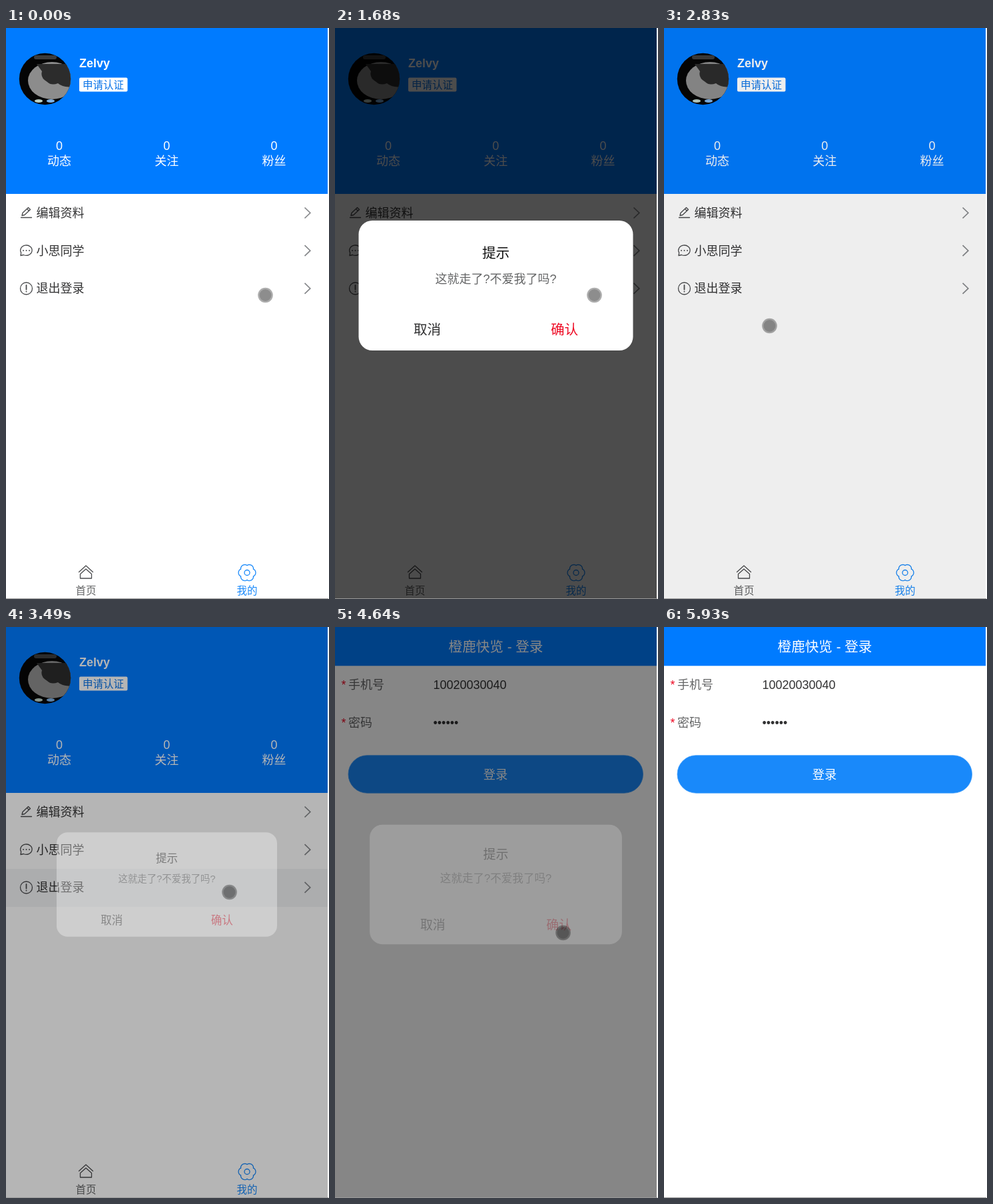
These frames come from a looping animation (485 by 857 pixels, 6360 ms). An HTML page:

```html
<!DOCTYPE html>
<html lang="zh-CN">
<head>
<meta charset="utf-8">
<style>
  html, body { margin: 0; width: 100%; height: 100%; overflow: hidden; background: #fff; }
  svg { display: block; font: 18px "Liberation Sans", "Noto Sans CJK SC", "Noto Sans CJK", sans-serif; fill: #323233; }
  .mid { text-anchor: middle; }
  .white { fill: #fff; }
  .small { font-size: 15.5px; }
  .big { font-size: 20.6px; }
  .line { fill: none; stroke: #4a4b4d; stroke-width: 1.3; stroke-linejoin: round; stroke-linecap: round; }
  .blue { stroke: #1989fa; }
</style>
</head>
<body>
<svg width="485" height="857" viewBox="0 0 485 857">
  <defs>
    <clipPath id="round"><circle cx="58.5" cy="76.5" r="38.7"/></clipPath>
    <path id="chevron" d="M448.5 269.5l8.3 8-8.3 8" fill="none" stroke="#86888b" stroke-width="1.7"/>
  </defs>

  <g id="profile">
    <rect width="483" height="249" fill="#007bff"/>
    <g clip-path="url(#round)">
      <rect x="19" y="37" width="80" height="80" fill="#050505"/>
      <ellipse cx="69" cy="79" rx="36" ry="28" fill="#8c8c8c"/>
      <path d="M46 54h54v34q-14 2-22-5-10 4-16-2-11-6-8-16z" fill="#2c2c2c"/>
      <rect x="42" y="41" width="34" height="6" rx="3" fill="#3c3c3c"/>
      <ellipse cx="49" cy="109.5" rx="6" ry="2.5" fill="#b9cfc5"/>
      <ellipse cx="67" cy="109.5" rx="6" ry="2.5" fill="#7eb2e6"/>
    </g>
    <text class="white" x="110" y="59" font-weight="bold">Zelvy</text>
    <rect class="white" x="110" y="74.5" width="72.5" height="21" rx="2"/>
    <text class="small" x="115" y="90.5" fill="#0a74e8">申请认证</text>
    <g id="stats" class="mid white"></g>

    <rect id="pressed" y="363" width="483" height="57" fill="#f2f3f5"/>
    <g id="rows"></g>
    <g class="line">
      <path d="M22.5 284.5h16M24 281.500l1-4 8.500-8 3 3-8.500 8zM31.500 271.500l3 3"/>
      <path d="M22 341.500l.7-4.200a8.700 7.700 0 1 1 3.600 3.200z"/>
      <circle cx="30.5" cy="391" r="9"/>
      <path d="M30.5 386v6.500M30.500 395.500v.2M26 334h.1M30.500 334h.1M35 334h.1" stroke-width="1.8"/>
    </g>

    <path class="line" d="M109.5 816.500l10.500-9.500 10.500 9.500M111.500 819.500v6.500h17v-6.500l-8.500-7.500z"/>
    <text class="mid small" x="120" y="850" fill="#646566">首页</text>
    <path id="gear" class="line blue"/>
    <circle class="line blue" cx="362" cy="817.5" r="4"/>
    <text class="mid small" x="362" y="850" fill="#1989fa">我的</text>
  </g>

  <g id="login">
    <rect width="483" height="58.3" fill="#007bff"/>
    <text class="mid white big" x="241.5" y="36.5">橙鹿快览 - 登录</text>
    <g fill="#ee0a24"><text x="9.5" y="93">*</text><text x="9.5" y="150">*</text></g>
    <g fill="#646566"><text x="20" y="93">手机号</text><text x="20" y="150">密码</text></g>
    <text x="147.5" y="93">10020030040</text>
    <text x="147.5" y="150">••••••</text>
    <rect x="20" y="192.7" width="442.5" height="56.5" rx="28.2" fill="#1989fa" stroke="#3f9dfb" stroke-width=".8"/>
    <text class="mid white" x="241" y="227.5" font-size="18.3">登录</text>
  </g>

  <rect id="shade" width="483" height="856" fill="#000"/>
  <g id="dialog" class="mid">
    <rect class="white" x="-206" y="-97.5" width="412" height="195" rx="20.5"/>
    <text class="big" y="-42" fill="#111">提示</text>
    <text y="-4" fill="#646566">这就走了?不爱我了吗?</text>
    <text class="big" x="-103" y="73.5">取消</text>
    <text class="big" x="103" y="73.5" fill="#ee0a24">确认</text>
  </g>
  <rect y="856" width="484" height="1" fill="#999"/>

  <g id="touch" fill="#000"><circle r="11.3" opacity=".32"/><circle r="9" opacity=".18"/></g>
  <path id="arrow" d="M.5.5v15.500l3.500-3.300 2.300 5 2.200-1-2.300-4.900h5z" fill="#fff" stroke="#000"/>
</svg>
<script>
const LOOP = 6360, FADE = 300;
const FIRST = 1430, TICK = 139.5;   // the screen refreshes in even ticks
const LOGIN = 23, ARROW = 30, GONE = 32;
const el = id => document.getElementById(id);
const show = (id, on) => el(id).style.display = on ? '' : 'none';

// Pointer stops: [tick, x, y]
const stops = [
  [2, 389.5, 401], [5, 335.5, 454.5], [6, 188.5, 453.5], [7, 138.5, 449.5],
  [9, 140, 449], [10, 158.5, 447], [11, 249.5, 434.5], [13, 332.5, 399.5],
  [15, 335.5, 398], [19, 342.5, 459], [27, 342.5, 459], [28, 320.5, 505.5],
  [29, 247, 533], [30, 247, 533], [31, 284, 535]
];

function pointer(k) {
  const i = stops.findIndex(s => s[0] >= k);
  if (i < 1) return stops.at(i).slice(1);
  const [a, b] = [stops[i - 1], stops[i]];
  const u = (k - a[0]) / (b[0] - a[0]);
  return [1, 2].map(n => a[n] + (b[n] - a[n]) * u);
}

function bezier(x1, y1, x2, y2) {
  const at = (a, b, u) => 3 * a * u * (1 - u) ** 2 + 3 * b * u * u * (1 - u) + u ** 3;
  return x => {
    if (x <= 0 || x >= 1) return x <= 0 ? 0 : 1;
    let lo = 0, hi = 1;
    for (let i = 0; i < 25; i++) {
      const u = (lo + hi) / 2;
      if (at(x1, x2, u) < x) lo = u; else hi = u;
    }
    return at(y1, y2, lo);
  };
}
const ease = bezier(.25, .1, .25, 1), easeIn = bezier(.42, 0, 1, 1), easeOut = bezier(0, 0, .58, 1);

function drawDialog(t) {
  const [open, close] = t < 3000 ? [1329, 2542] : [3456, 4487];
  const leaving = t >= close;
  const p = ease((t - (leaving ? close : open)) / FADE);
  const scale = leaving ? 1 - .1 * p : .7 + .3 * p;
  const dark = leaving ? 1 - easeIn((t - close) / FADE) : easeOut((t - open + 17) / FADE);
  el('dialog').setAttribute('transform', `translate(241.5 386.5) scale(${scale})`);
  el('dialog').setAttribute('opacity', leaving ? 1 - p : p);
  el('shade').setAttribute('opacity', .7 * dark);
}

function draw(time) {
  const k = Math.floor((time - FIRST) / TICK + .31);
  show('profile', k < LOGIN);
  show('login', k >= LOGIN);
  show('pressed', k === 14 || k === 15);
  drawDialog(FIRST + k * TICK);
  show('touch', k < ARROW);
  show('arrow', k >= ARROW && k < GONE);
  el(k < ARROW ? 'touch' : 'arrow').setAttribute('transform', `translate(${pointer(k)})`);
}

el('stats').innerHTML = ['动态', '关注', '粉丝'].map((name, i) => {
  const x = 80 + 161.2 * i;
  return `<text x="${x}" y="183">0</text><text x="${x}" y="206">${name}</text>`;
}).join('');

el('rows').innerHTML = ['编辑资料', '小思同学', '退出登录'].map((name, i) =>
  `<g transform="translate(0 ${56.7 * i})"><text x="45.5" y="284">${name}</text><use href="#chevron"/></g>`
).join('');

const rim = Array.from({ length: 72 }, (_, i) => {
  const a = i * Math.PI / 36, r = 10.8 + 2.1 * Math.abs(Math.cos(3 * a)) ** .7;
  return [362 + r * Math.cos(a), 817.5 + r * Math.sin(a)];
});
el('gear').setAttribute('d', `M${rim.join('L')}z`);

const start = performance.now();
function tick() {
  draw((performance.now() - start) % LOOP);
  requestAnimationFrame(tick);
}
tick();
</script>
</body>
</html>
```
